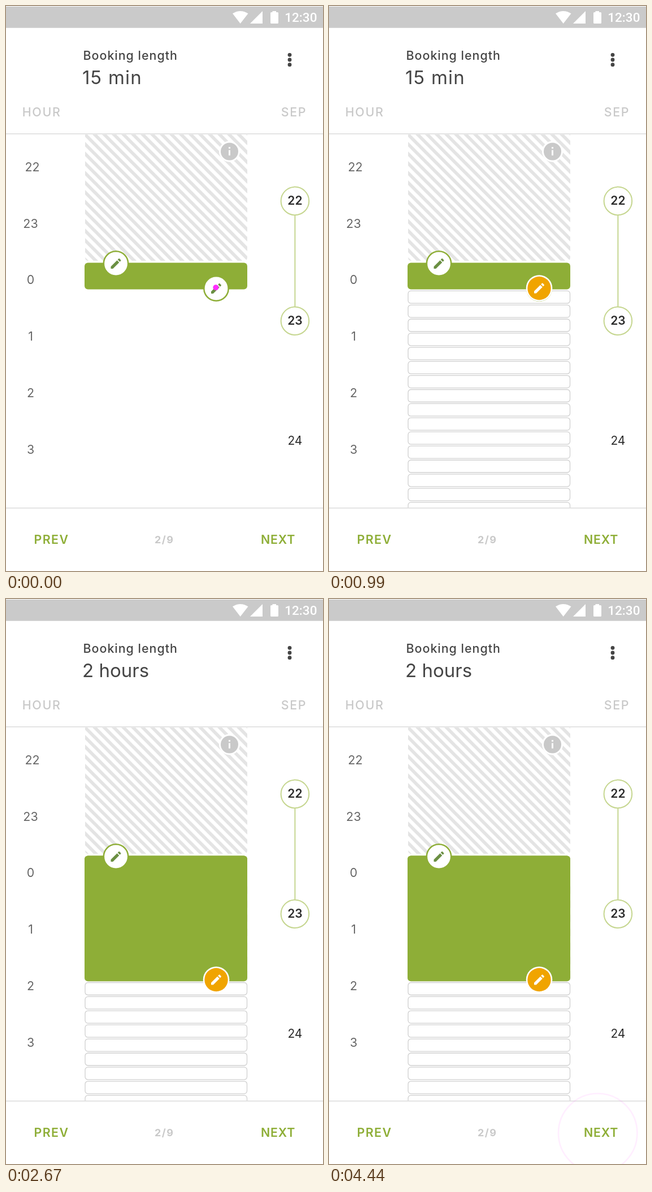
Animation of 561x998 px, one loop 4500 ms. Source, as an HTML page:

```html
<!DOCTYPE html>
<html lang="en">
<head>
<meta charset="utf-8">
<title>Booking length</title>
<style>
  html, body { margin: 0; width: 100%; height: 100%; overflow: hidden; background: #fff; }
  svg { display: block; width: 561px; height: 998px; }
  text { font-family: Inter, "Open Sans", sans-serif; font-size: 21.4px; fill: #666; }
  .mid { text-anchor: middle; }
  .clock { font: 500 22.5px Roboto, sans-serif; fill: #fff; }
  .title { font-weight: 500; fill: #454545; letter-spacing: 1px; }
  .value { font-size: 33px; font-weight: 400; fill: #454545; }
  .label { font-weight: 500; fill: #c9c9c9; letter-spacing: 1.7px; }
  .day { font-size: 21px; fill: #2b2b2b; }
  .picked { font-weight: 600; }
  .nav { font-weight: 600; fill: #8eae37; }
  .page { font-size: 18px; font-weight: 700; fill: #c9c9c9; letter-spacing: 1.5px; }
  .green { fill: #8eae37; }
  .rule { fill: #dcdcdc; }
  .chain { fill: #fff; stroke: #c5d68f; stroke-width: 2; }
  .slot { fill: #fff; stroke: #cfcfcf; stroke-width: 1.3; }
  .ring { fill: none; stroke: #ff2eff; }
</style>
</head>
<body>
<svg viewBox="0 0 561 998">
  <defs>
    <pattern id="hatch" width="17" height="17" patternUnits="userSpaceOnUse" x="140" y="227">
      <path d="M-17-17 34 34M-17 0 17 34M0-17 34 17" stroke="#e4e4e4" stroke-width="5.8"/>
    </pattern>
    <clipPath id="list"><rect y="226" width="561" height="660.5"/></clipPath>
    <path id="pencil" transform="translate(-12 -12)" d="M3 17.25V21h3.75L17.81 9.94l-3.75-3.75zM20.71 7.04c.39-.39.39-1.02 0-1.41l-2.34-2.34c-.39-.39-1.02-.39-1.41 0l-1.83 1.83 3.75 3.75z"/>
    <g id="knob">
      <circle r="21.7" fill="#fff" stroke="#8eae37" stroke-width="2.6"/>
      <use href="#pencil" fill="#6a8f42"/>
    </g>
    <g id="active">
      <circle r="23.3" fill="#fff"/>
      <circle r="20.7" fill="#f0a400"/>
      <use href="#pencil" fill="#fff"/>
    </g>
  </defs>

  <rect width="561" height="998" fill="#fff"/>
  <rect y="1" width="561" height="37.7" fill="#cacaca"/>
  <g fill="#fff">
    <path d="M401 13.3Q414.7 4.5 428.5 13.3L414.7 31ZM454 9V31H432Z"/>
    <path d="M471.5 9h6.5v2h2.5q1.5 0 1.5 1.5v17q0 1.5-1.5 1.5h-11q-1.5 0-1.5-1.5v-17q0-1.5 1.5-1.5h2z"/>
  </g>
  <text class="clock" x="493.3" y="28">12:30</text>

  <text class="title" x="136.5" y="95">Booking length</text>
  <text class="value" id="before" x="135" y="138" letter-spacing="1.2">15 min</text>
  <text class="value" id="after" x="135" y="138">2 hours</text>
  <g fill="#454545">
    <circle cx="502" cy="86.3" r="3.4"/>
    <circle cx="502" cy="95" r="3.4"/>
    <circle cx="502" cy="103.7" r="3.4"/>
  </g>
  <text class="label" x="28.7" y="195">HOUR</text>
  <text class="label" x="486.7" y="195">SEP</text>

  <g clip-path="url(#list)">
    <path d="M140 227H427V444q0 6-6 6H146q-6 0-6-6z" fill="url(#hatch)"/>
    <g id="slots"></g>
  </g>
  <circle cx="395.5" cy="257" r="18.5" fill="#fff"/>
  <circle cx="395.5" cy="257" r="15.5" fill="#c9c9c9"/>
  <path d="M394 249h3v3h-3zM394 254.5h3v9.5h-3z" fill="#fff"/>

  <rect class="green" x="139" y="453.6" width="288" height="46.9" rx="6"/>
  <use href="#knob" x="372" y="499"/>
  <use href="#active" id="pressed" x="372" y="498.5"/>
  <g id="longer">
    <rect class="green" x="139" y="453.6" width="288" height="221.7" rx="6"/>
    <use href="#active" x="372" y="672.5"/>
  </g>
  <use href="#knob" x="194.5" y="455"/>

  <g id="hours"></g>

  <path class="chain" d="M511.4 369V531"/>
  <circle class="chain" cx="511.4" cy="344.4" r="24.8"/>
  <circle class="chain" cx="511.4" cy="556.2" r="24.8"/>
  <text class="day picked mid" x="511.4" y="350.5">22</text>
  <text class="day picked mid" x="511.4" y="562.5">23</text>
  <text class="day mid" x="511.4" y="775">24</text>

  <rect class="rule" y="225" width="561" height="1.5"/>
  <rect class="rule" y="886" width="561" height="1.5"/>
  <text class="nav" x="49.5" y="949.5" letter-spacing="1.4">PREV</text>
  <text class="page" x="263" y="949">2/9</text>
  <text class="nav" x="451" y="949.5" letter-spacing=".8">NEXT</text>

  <circle class="ring" id="ring"/>
</svg>
<script>
  const LOOP = 4500, STEP = 30, RADIUS = 71;
  const taps = [
    { at: 0, x: 371.3, y: 497.3 },
    { at: 1770, x: 278.5, y: 663.3 },
    { at: 3600, x: 475.7, y: 943.3 }
  ];
  const $ = id => document.getElementById(id);
  const clamp = v => Math.min(1, Math.max(0, v));
  const span = (t, from, to) => clamp((t - from) / (to - from));
  const easeOut = (p, power) => 1 - (1 - p) ** power;

  function add(parent, tag, attrs, text = '') {
    const el = document.createElementNS('http://www.w3.org/2000/svg', tag);
    for (const key in attrs) el.setAttribute(key, attrs[key]);
    el.textContent = text;
    parent.append(el);
  }

  for (let i = 0; i < 16; i++) {
    add($('slots'), 'rect', { class: 'slot', x: 140, y: 503.2 + i * 24.9, width: 286.5, height: 22, rx: 5 });
  }
  [22, 23, 0, 1, 2, 3].forEach((hour, i) => {
    add($('hours'), 'text', { class: 'mid', x: i ? 43.5 : 46.5, y: 292 + i * 99.7 }, hour);
  });

  // A disc grows first, then a hole opens in it while it fades.
  function drawRing(t) {
    const tap = taps.filter(p => p.at <= t).pop();
    const age = t - tap.at;
    const outer = 5 + (RADIUS - 5) * easeOut(span(age, 0, 700), 2);
    const inner = RADIUS * easeOut(span(age, 170, 1170), 3);
    const ring = $('ring');
    ring.setAttribute('cx', tap.x);
    ring.setAttribute('cy', tap.y);
    ring.setAttribute('r', (outer + inner) / 2);
    ring.setAttribute('stroke-width', outer - inner);
    ring.setAttribute('opacity', clamp((880 - age) / 500));
  }

  function draw(ms) {
    const t = Math.floor((ms % LOOP) / STEP) * STEP;
    const edit = span(t, 690, 990);
    const grow = span(t, 2370, 2670);
    $('slots').setAttribute('opacity', edit);
    $('pressed').setAttribute('opacity', edit);
    $('longer').setAttribute('opacity', grow);
    $('after').setAttribute('opacity', grow);
    $('before').setAttribute('opacity', 1 - grow);
    drawRing(t);
  }

  const start = performance.now();
  function tick() {
    draw(performance.now() - start);
    requestAnimationFrame(tick);
  }
  tick();
</script>
</body>
</html>
```
